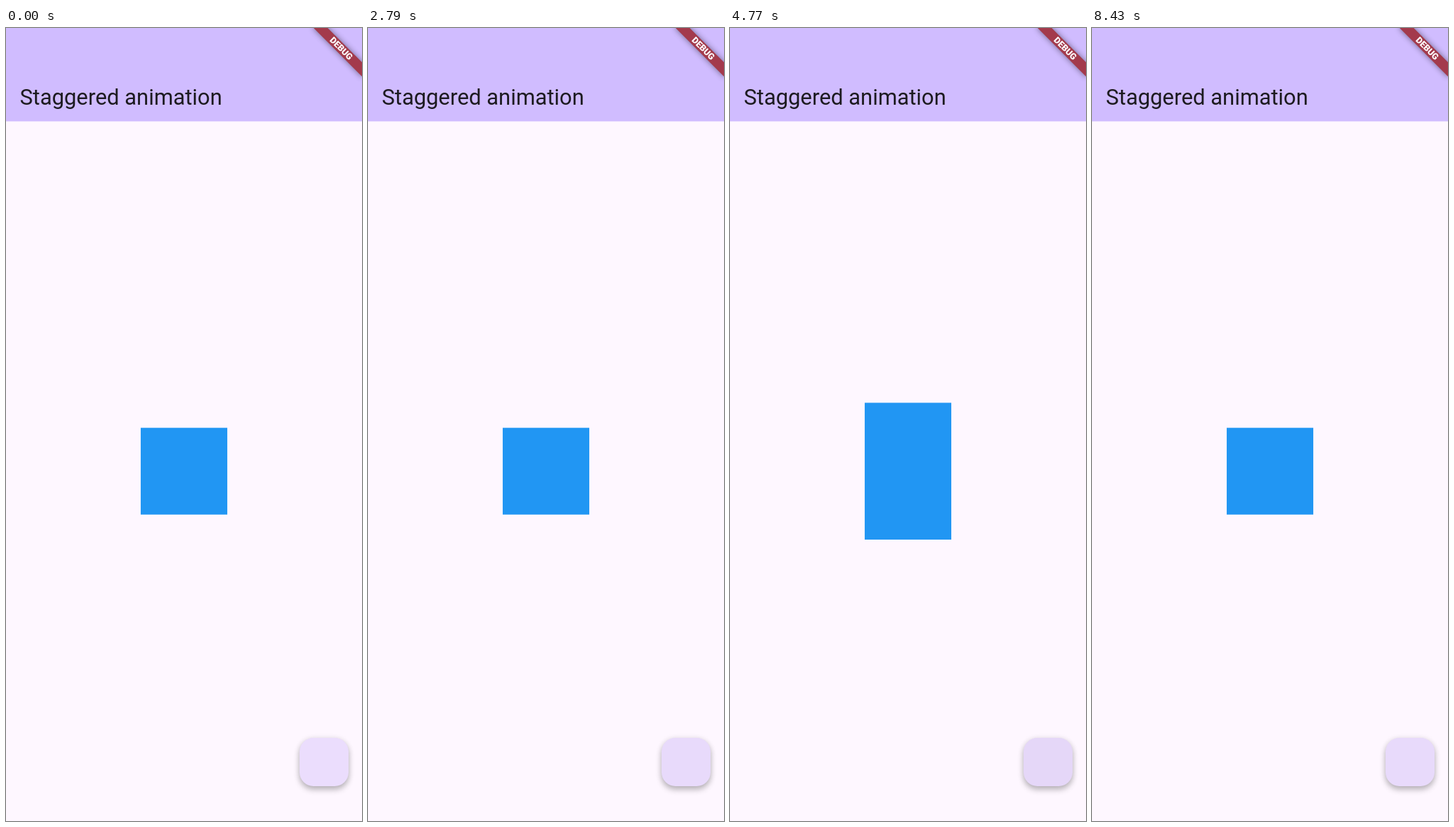
These frames come from a looping animation (502x1116 px, 8550 ms). An HTML page:

```html
<!DOCTYPE html>
<html lang="en">
<head>
<meta charset="utf-8">
<title>Staggered animation</title>
<style>
  html, body { margin: 0; width: 100%; height: 100%; overflow: hidden; }
  body { position: relative; background: #fef7ff; font-family: Roboto, sans-serif; }
  svg, div { position: absolute; }
  svg { left: 0; top: 0; }
  #box { filter: blur(.4px); }
  #title { left: 19.5px; top: 79px; font-size: 30.87px; line-height: 37px; color: #1d1b20; white-space: nowrap; }
  #banner {
    left: 453.2px; top: 34.2px; width: 97.6px; height: 14px;
    transform-origin: 48.8px -34.2px; transform: rotate(45deg);
    background: #a33a4c; box-shadow: 0 0 8px rgba(0, 0, 0, .48);
    color: #fff; font-size: 12.4px; font-weight: 900; line-height: 14.6px; text-align: center;
  }
  #button {
    left: 414.2px; top: 999px; width: 68.4px; height: 68.4px; border-radius: 19.5px;
    box-shadow: 0 5px 8px rgba(0, 0, 0, .24), 0 1px 9px rgba(0, 0, 0, .1);
  }
</style>
</head>
<body>
<svg width="502" height="1116">
  <rect width="502" height="131.4" fill="#d0bcff"/>
  <rect id="box"/>
</svg>
<div id="title">Staggered animation</div>
<div id="banner">DEBUG</div>
<div id="button"></div>
<script>
const LOOP = 8550, DURATION = 500, STEP = 62;
const CENTER_X = 251, CENTER_Y = 623.7, SMALL = 122.1, LARGE = 366.1;
const BLUE = [33, 150, 243], RED = [244, 67, 54];
const IDLE = [235, 221, 253], PRESSED = [211, 196, 233];

// Each tap: press time, delay until the box reacts, direction, ripple length
const taps = [
  { at: 930, delay: 57, forward: true, ripple: 690 },
  { at: 2170, delay: 105, forward: false, ripple: 690 },
  { at: 3220, delay: 165, forward: true, ripple: 690 },
  { at: 4210, delay: 125, forward: false, ripple: 690 },
  { at: 5270, delay: 110, forward: true, ripple: 690 },
  { at: 6200, delay: 110, forward: false, ripple: 690 },
  { at: 8000, delay: Infinity, forward: true, ripple: 480 }
];

const box = document.getElementById('box');
const button = document.getElementById('button');
const clamp = v => Math.min(1, Math.max(0, v));
const interval = (t, from, to) => clamp((t - from) / (to - from));
const mix = (a, b, k) => a + (b - a) * k;
const blend = (a, b, k) => `rgb(${a.map((v, i) => Math.round(mix(v, b[i], k)))})`;

function stateAt(time) {
  const tap = taps.findLast(p => time >= p.at);
  if (!tap) return { progress: 0, ripple: 0 };
  const since = Math.floor((time - tap.at + 6) / STEP) * STEP;
  const run = clamp((since - tap.delay) / DURATION);
  const age = since + 20;
  return {
    progress: tap.forward ? run : 1 - run,
    ripple: Math.min(clamp(age / 80), 1 - interval(age, 250, tap.ripple))
  };
}

function draw() {
  const { progress, ripple } = stateAt(performance.now() % LOOP);
  const height = mix(SMALL, LARGE, interval(progress, 0, .464));
  const width = mix(SMALL, LARGE, interval(progress, .4, .985));
  box.setAttribute('width', width);
  box.setAttribute('height', height);
  box.setAttribute('x', CENTER_X - width / 2);
  box.setAttribute('y', CENTER_Y - height / 2);
  box.setAttribute('fill', blend(BLUE, RED, interval(progress, .614, 1)));
  button.style.background = blend(IDLE, PRESSED, ripple);
  requestAnimationFrame(draw);
}
draw();
</script>
</body>
</html>
```
